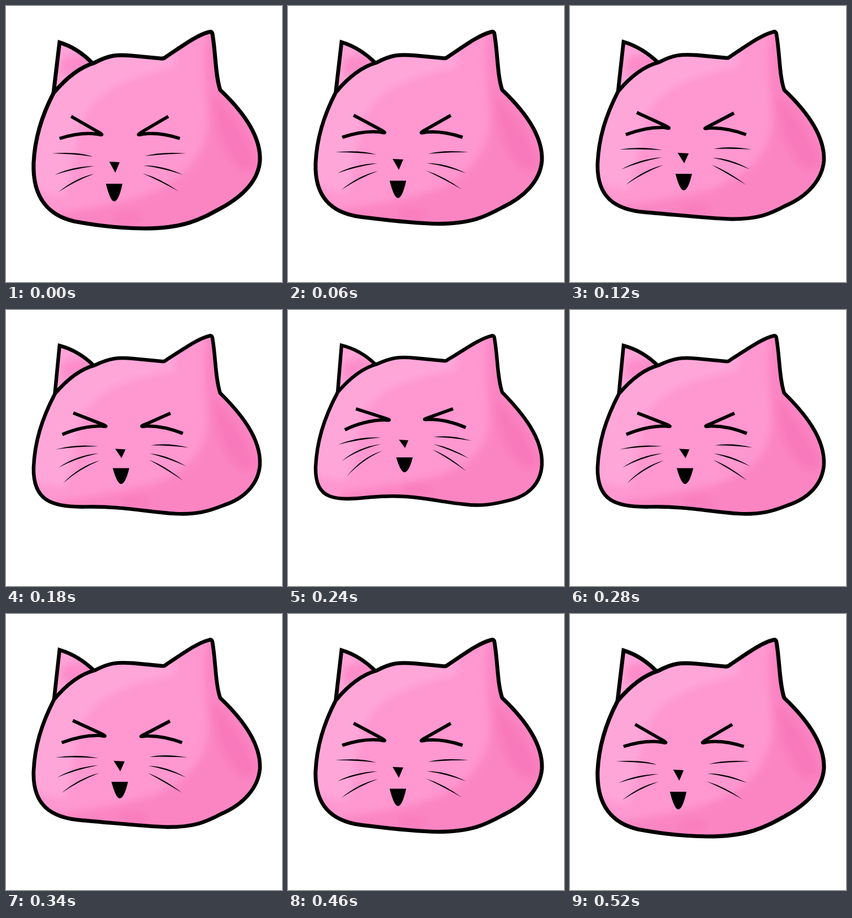
Recreate the animation shown at these times as an HTML page. Size 500 by 500 pixels, loop 0.58 s.

```html
<!DOCTYPE html>
<html lang="en">
<head>
<meta charset="utf-8">
<title>Bouncy cat</title>
<style>
  html, body { margin: 0; width: 100%; height: 100%; overflow: hidden; background: #fff; }
  svg { display: block; width: 100%; height: 100%; }
</style>
</head>
<body>
<svg id="stage" viewBox="0 0 500 500">
  <defs>
    <filter id="soft" x="-30%" y="-30%" width="160%" height="160%"><feGaussianBlur stdDeviation="7"/></filter>
    <clipPath id="headClip"><path data-part="head"/></clipPath>
    <clipPath id="earClip"><path data-part="ear"/></clipPath>
  </defs>
  <g clip-path="url(#earClip)">
    <rect width="500" height="500" fill="#ffa4d8"/>
    <path d="M100 98Q122 82 165 92L165 125L100 125Z" fill="#fd8cca" filter="url(#soft)"/>
  </g>
  <path data-part="ear" class="line" fill="none" stroke="#000"/>
  <g clip-path="url(#headClip)">
    <rect width="500" height="500" fill="#ff97d0"/>
    <g filter="url(#soft)">
      <path data-part="light" fill="#ffa6d9"/>
      <path data-part="shade" fill="#fb85c3"/>
      <path data-part="cheek" fill="#f97abc"/>
      <path data-part="chin" fill="#f97dbe"/>
    </g>
  </g>
  <path data-part="head" class="line" fill="none" stroke="#000" stroke-linejoin="round"/>
  <g fill="none" stroke="#000" stroke-width="6" stroke-linejoin="round">
    <path data-part="eyeL"/>
    <path data-part="eyeR"/>
  </g>
  <path data-part="nose"/>
  <path data-part="mouth"/>
  <path data-part="whiskers"/>
</svg>
<script>
// A tapered hair from (x1,y1) to (x2,y2), bent through (cx,cy).
const hair = ([x1, y1, cx, cy, x2, y2]) =>
  `M${x1} ${y1}Q${cx} ${cy - 2.6} ${x2} ${y2}Q${cx} ${cy + 2.6} ${x1} ${y1}Z`;
const hairs = (...list) => list.map(hair).join('');

const mouth = (x, y, h) =>
  `M${x} ${y}L${x + 30} ${y}Q${x + 23} ${y + h} ${x + 15} ${y + h}Q${x + 8} ${y + h} ${x} ${y}Z`;

// Three key poses for each part: relaxed, squeezed, flat.
const body = {
  ear: [
    'M86 158L97 66Q130 76 158 105L140 118Z',
    'M87 155L97 65Q131 75 160 103L140 116Z',
    'M90 149L97 64Q131 72 159 99L140 112Z'
  ],
  head: [
    'M86 158C106 134 130 112 160 103C188 88 202 88 228 90L280 95Q286 96 290 92C320 72 345 53 368 47Q373 45 374 51C380 85 379 125 388 152C425 187 462 232 460 280C457 320 425 347 388 367C355 385 325 403 250 403C190 402 150 395 123 390C80 380 48 350 50 285C52 240 64 200 86 158Z',
    'M87 155C106 132 130 110 161 102C188 88 202 87 230 89L282 94Q287 95 291 91C320 72 345 53 368 47Q373 45 374 51C380 85 379 125 388 152C425 187 462 232 460 280C457 315 430 345 390 362C360 378 340 386 293 386C250 385 190 378 140 374C80 370 48 345 50 285C52 240 64 200 87 155Z',
    'M90 149C108 128 132 106 161 98C188 86 202 84 230 87L282 92Q287 93 291 89C320 72 345 53 368 47Q373 45 374 51C380 85 379 122 388 149C425 187 462 232 460 280C458 315 435 337 400 345C372 352 350 356 320 352C265 347 225 332 150 339C85 346 49 345 50 285C52 240 64 198 90 149Z'
  ],
  light: [
    'M40 60L310 60L305 112C220 128 165 155 142 200C118 260 125 310 105 345L40 330Z',
    'M40 60L310 60L305 112C220 125 165 150 142 192C118 250 125 300 105 335L40 320Z',
    'M40 60L310 60L305 110C220 122 165 145 142 180C118 225 125 275 105 310L40 300Z'
  ],
  shade: [
    'M368 40C352 90 364 150 366 205C364 270 325 310 270 336C220 356 160 366 95 376L110 430L480 430L480 40Z',
    'M368 40C352 90 364 150 366 205C364 265 325 303 270 327C220 343 160 354 95 362L110 430L480 430L480 40Z',
    'M368 40C352 90 364 150 364 200C362 255 325 284 270 300C220 312 160 322 95 330L110 430L480 430L480 40Z'
  ],
  cheek: [
    'M374 160C400 180 440 225 458 290Q440 306 420 296C385 260 374 210 374 160Z',
    'M374 160C400 180 440 225 458 286Q440 304 420 292C385 258 374 210 374 160Z',
    'M374 158C400 180 440 225 458 280Q440 298 420 282C385 252 374 206 374 158Z'
  ],
  chin: [
    'M192 382Q222 366 252 382Q240 398 205 396Z',
    'M200 364Q230 350 262 366Q245 382 212 380Z',
    'M205 322Q235 310 268 324Q255 342 215 338Z'
  ]
};

const face = {
  eyeL: [
    'M118 200L165 227Q182 236 165 232Q135 228 97 240',
    'M121 193L171 216Q188 224 170 220Q138 219 101 233',
    'M123 179L176 196Q191 201 175 199Q138 200 103 217'
  ],
  eyeR: [
    'M294 200L248 227Q232 236 248 232Q278 228 315 240',
    'M297 194L253 217Q236 224 253 221Q284 220 319 233',
    'M299 179L254 195Q240 200 256 198Q287 198 322 213'
  ],
  nose: [
    'M187 282L206 283L198 302Z',
    'M195 266L215 267L207 285Z',
    'M201 235L218 236L212 250Z'
  ],
  mouth: [mouth(181, 322, 32), mouth(191, 304, 30), mouth(196, 267, 27)],
  whiskers: [
    hairs([83, 267, 132, 266, 157, 273], [88, 306, 120, 293, 160, 290], [95, 337, 126, 314, 160, 304],
      [251, 272, 280, 266, 326, 267], [249, 289, 284, 291, 321, 306], [247, 303, 280, 315, 313, 336]),
    hairs([89, 260, 130, 256, 167, 261], [93, 296, 125, 280, 167, 274], [101, 324, 132, 300, 169, 288],
      [260, 259, 288, 255, 329, 260], [258, 275, 290, 278, 326, 296], [257, 288, 285, 301, 319, 324]),
    hairs([91, 244, 125, 232, 168, 231], [97, 274, 128, 250, 169, 243], [106, 302, 134, 269, 171, 255],
      [264, 230, 294, 228, 333, 237], [263, 243, 295, 251, 328, 269], [262, 253, 290, 266, 323, 292])
  ]
};

// [end time in ms, body level, face level]; 0 relaxed, 1 squeezed, 2 flat
const steps = [
  [60, 0, 0], [120, .5, .31], [180, 1, 1], [240, 1.5, 1.47], [280, 2, 2],
  [340, 1.5, 1.47], [460, 1, 1], [520, .5, .31], [580, 0, 0]
];
const LOOP = 580;

function blend(poses, level) {
  const i = Math.min(1, Math.floor(level)), t = level - i;
  const next = poses[i + 1].match(/[\d.]+/g);
  let n = 0;
  return poses[i].replace(/[\d.]+/g, v => (+v + (next[n++] - v) * t).toFixed(2));
}

function setParts(parts, level) {
  for (const name in parts) {
    const d = blend(parts[name], level);
    document.querySelectorAll(`[data-part="${name}"]`).forEach(el => el.setAttribute('d', d));
  }
}

let shown = null;
function draw(ms) {
  const step = steps.find(s => ms % LOOP < s[0]);
  if (step === shown) return;
  shown = step;
  const [, bodyLevel, faceLevel] = step;
  setParts(body, bodyLevel);
  setParts(face, faceLevel);
  document.querySelectorAll('.line').forEach(el => el.setAttribute('stroke-width', 7.2 - bodyLevel * .4));
}

const start = performance.now();
function tick() {
  draw(performance.now() - start);
  requestAnimationFrame(tick);
}
tick();
</script>
</body>
</html>
```
